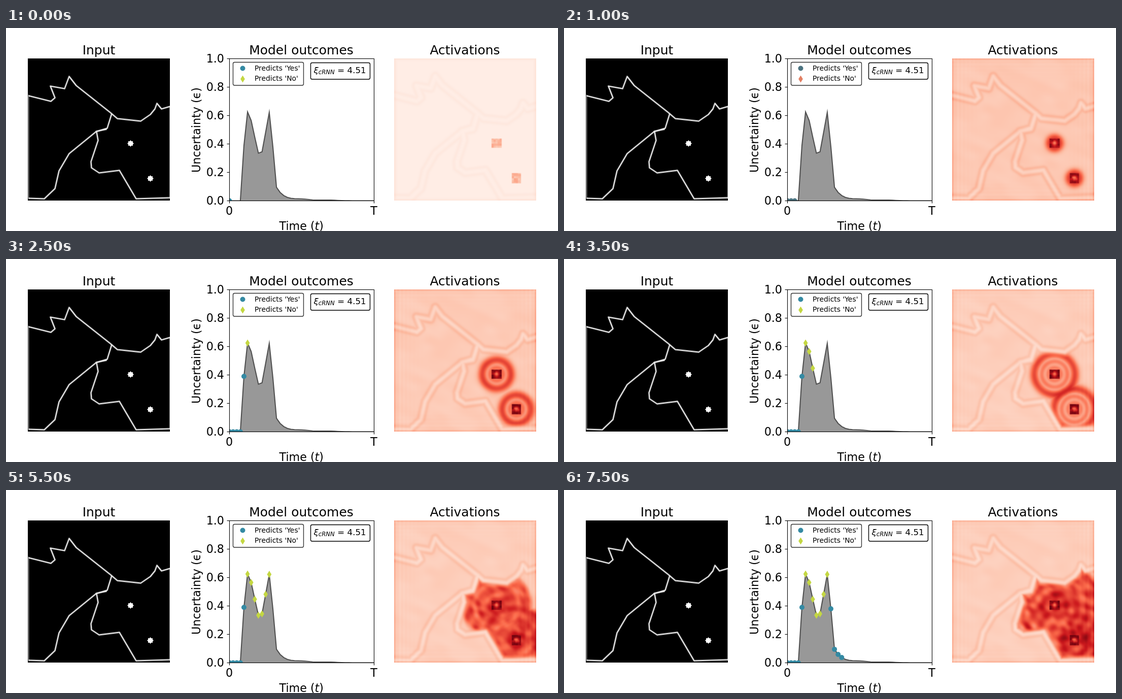
These frames come from a looping animation (1088x400 px, 8 s). An HTML page with a canvas:

```html
<!DOCTYPE html>
<html lang="en">
<head>
<meta charset="utf-8">
<title>Model outcomes</title>
<style>
html, body { margin: 0; width: 100%; height: 100%; overflow: hidden; background: #fff; }
canvas { display: block; }
</style>
</head>
<body>
<canvas id="stage" width="1088" height="400"></canvas>
<script>
const STEP_MS = 500, STEPS = 16;
const ctx = document.getElementById('stage').getContext('2d');
const FONT = '"DejaVu Sans", sans-serif';

const clamp = (v, a = 0, b = 1) => Math.min(b, Math.max(a, v));
const smooth = (a, b, v) => { const t = clamp((v - a) / (b - a)); return t * t * (3 - 2 * t); };
const mix = (a, b, t) => a + (b - a) * t;
const bump = (d, w) => Math.exp(-d * d / (w * w));

// Corner points of the outlines in the input panel.
const ridge = [[44, 133], [88, 144], [96, 137], [87, 114], [115, 119], [124, 95], [138, 113], [205, 166]];
const back = [[205, 166], [219, 178], [265, 183], [284, 170], [293, 159], [297, 148], [306, 159], [323, 154]];
const neck = [[208, 168], [199, 197], [176, 204]];
const slope = [[198, 199], [178, 203], [124, 247], [104, 281], [96, 316], [75, 336], [44, 335]];
const belly = [[178, 204], [181, 221], [167, 263], [168, 275], [183, 285], [223, 280], [256, 336], [323, 334]];
const outlines = [ridge, back, neck, slope, belly];
const dots = [[245, 227], [284, 296]];

// Two peaks, then a decaying tail with two faint bumps.
const peaks = [.39, .625, .565, .447, .335, .345, .482, .622, .38];
const value = i => i < 4 ? 0 : peaks[i - 4] ??
  .095 * .62 ** (i - 13) + .01 * bump(i - 20, 3) + .005 * bump(i - 27, 4);
const plotX = i => 440.5 + i * 285 / 40;
const plotY = v => 340.5 - v * 280;
const curve = Array.from({ length: 41 }, (_, i) => [plotX(i), plotY(value(i))]);
const saysNo = i => i >= 5 && i <= 11;

function trace(points, target = ctx) {
  points.forEach(([x, y], i) => i ? target.lineTo(x, y) : target.moveTo(x, y));
}
function stroke(points, color, width) {
  ctx.beginPath();
  trace(points);
  ctx.strokeStyle = color;
  ctx.lineWidth = width;
  ctx.stroke();
}
function text(str, x, y, size, align = 'center', style = '') {
  ctx.font = `${style} ${size}px ${FONT}`;
  ctx.textAlign = align;
  ctx.fillStyle = '#000';
  ctx.fillText(str, x, y);
  return x + ctx.measureText(str).width;
}
function box(x, y, w, h, color) {
  ctx.beginPath();
  ctx.roundRect(x, y, w, h, 3);
  ctx.fillStyle = '#fff';
  ctx.fill();
  ctx.strokeStyle = color;
  ctx.lineWidth = 1.4;
  ctx.stroke();
}
function marker(x, y, no, color) {
  ctx.beginPath();
  if (no) trace([[x, y - 7], [x + 4.4, y], [x, y + 7], [x - 4.4, y]]);
  else ctx.arc(x, y, 5, 0, 7);
  ctx.fillStyle = color;
  ctx.fill();
}

// Activation map: a scalar field on a coarse grid, coloured from white to dark red.
const N = 140, CELL = 2, LEFT = 43, TOP = 60, SIZE = N * CELL;
const ramp = ['fff5f0', 'fcbba1', 'fb6a4a', 'cb181d', '67000d'].map(h => parseInt(h, 16));
const channel = (rgb, ch) => rgb >> (16 - 8 * ch) & 255;
const map = document.createElement('canvas');
map.width = map.height = N;
const mapCtx = map.getContext('2d');

function segDist(x, y, [ax, ay], [bx, by]) {
  const dx = bx - ax, dy = by - ay;
  const t = clamp(((x - ax) * dx + (y - ay) * dy) / (dx * dx + dy * dy));
  return Math.hypot(x - ax - t * dx, y - ay - t * dy);
}
function hash(i, j) {
  const h = Math.sin(i * 127.1 + j * 311.7) * 43758.5453;
  return h - Math.floor(h);
}
function noise(x, y) {
  const i = Math.floor(x), j = Math.floor(y), u = smooth(0, 1, x - i), v = smooth(0, 1, y - j);
  return mix(mix(hash(i, j), hash(i + 1, j), u), mix(hash(i, j + 1), hash(i + 1, j + 1), u), v) * 2 - 1;
}

// The closed shape that holds both dots and the spreading waves.
const region = new Path2D();
trace([...back, ...belly.slice().reverse(), ...neck.slice(0, 2).reverse()], region);
region.closePath();

const cells = Array.from({ length: N * N }, (_, k) => {
  const x = LEFT + (k % N + .5) * CELL, y = TOP + (Math.floor(k / N) + .5) * CELL;
  const line = Math.min(...outlines.flatMap(o => o.slice(1).map((p, i) => segDist(x, y, o[i], p))));
  return {
    x, y, line,
    side: Math.min(x - LEFT, LEFT + SIZE - x),
    cap: Math.min(y - TOP, TOP + SIZE - y),
    inside: ctx.isPointInPath(region, x, y) ? smooth(0, 13, line) : 0,
    d: dots.map(([a, b]) => Math.hypot(x - a, y - b)),
    square: dots.map(([a, b]) => Math.max(Math.abs(x - a), Math.abs(y - b)))
  };
});

function backdrop(c, s, ready) {
  const early = bump(s - 3, 2), side = Math.exp(-c.side / 16), cap = Math.exp(-c.cap / 14);
  return .03 + .138 * ready + .04 * early
    - .05 * ready * bump(c.line, 3.2)
    + (.02 + .04 * ready + .02 * early) * bump(c.line - 6.5, 3)
    + (.04 + .08 * ready) * bump(Math.min(c.side, c.cap + 1), 4)
    + ready * (.03 * Math.cos(c.side * .8) * side + .02 * Math.cos(c.cap * .8) * cap)
    + .018 * ready * noise(c.x / 34 + c.y / 45, c.y / 18 - c.x / 40);
}

function ring(d, R, s) {
  const wake = .19 + .06 * Math.cos(d * .5) + .3 * Math.exp(-s / 3);
  return Math.max(.44 * bump(d - R + 7, 9), wake * smooth(R + 2, R - 8, d));
}

function waves(c, s) {
  const R = 5 + 6 * s, [a, b] = c.d, near = Math.min(a, b);
  const w1 = ring(a, R, s), w2 = ring(b, R, s);
  const rings = Math.max(w1, w2) + .25 * Math.min(w1, w2);
  const churn = .41 + .2 * bump(near, 30) + .05 * Math.cos(.3 * a - .9 * s) + .05 * Math.cos(.27 * b + .8 * s)
    + .14 * noise((c.x + c.y) / 22 + s * .3, (c.y - c.x) / 13 - s * .2);
  return mix(rings, churn * smooth(R + 4, R - 10, near), clamp((s - 7) / 5)) * c.inside;
}

function level(c, s) {
  const ready = 1 - Math.exp(-1.5 * s);
  let v = backdrop(c, s, ready);
  if (s > 1 && c.inside) v += waves(c, s);
  dots.forEach((_, i) => {
    const grain = hash(Math.floor(c.x / 4), Math.floor(c.y / 4)) - .5;
    const dark = .93 - .68 * Math.exp(-1.2 * s) + .14 * grain - .4 * ready * bump(c.d[i] - 1, 4);
    if (c.square[i] < 10) v = dark;
  });
  return clamp(v);
}

const activations = Array.from({ length: STEPS }, (_, s) => {
  const img = mapCtx.createImageData(N, N), top = ramp.length - 1;
  cells.forEach((c, k) => {
    const v = level(c, s) * top, i = Math.min(top - 1, Math.floor(v));
    for (let ch = 0; ch < 3; ch++) img.data[k * 4 + ch] = mix(channel(ramp[i], ch), channel(ramp[i + 1], ch), v - i);
    img.data[k * 4 + 3] = 255;
  });
  return img;
});

function drawInput() {
  ctx.fillStyle = '#000';
  ctx.fillRect(LEFT, TOP, SIZE, SIZE);
  ctx.save();
  ctx.beginPath();
  ctx.rect(LEFT, TOP, SIZE, SIZE);
  ctx.clip();
  ctx.translate(.5, .5);
  ctx.lineJoin = 'round';
  stroke([[44, 131], [44, 336]], '#8a8a8a', 1.8);
  stroke([[322, 154], [322, 335]], '#777', 1.4);
  for (const o of outlines) {
    stroke(o, 'rgba(255,255,255,.3)', 3.8);
    stroke(o, '#e8e8e8', 2.1);
  }
  ctx.fillStyle = '#fff';
  for (const [x, y] of dots) {
    ctx.beginPath();
    for (let i = 0; i < 16; i++) {
      const r = i % 2 ? 4.7 : 6.5, a = i * Math.PI / 8;
      ctx.lineTo(x + r * Math.cos(a), y + r * Math.sin(a));
    }
    ctx.fill();
  }
  ctx.restore();
}

function drawChart(s) {
  const muted = s > 0 && s < 5;
  const yes = muted ? '#4b7380' : '#348aa3', no = muted ? '#e28064' : '#c4d742';
  ctx.save();
  ctx.beginPath();
  ctx.rect(440, 60, 286, 281);
  ctx.clip();
  ctx.beginPath();
  trace(curve);
  ctx.fillStyle = '#989898';
  ctx.fill();
  stroke(curve, '#505050', 2.1);
  for (let i = 0; i <= s; i++) marker(...curve[i], saysNo(i), saysNo(i) ? no : yes);
  ctx.restore();

  ctx.strokeStyle = '#000';
  ctx.lineWidth = 1.1;
  ctx.strokeRect(440.5, 60.5, 285, 280);
  for (let i = 0; i <= 5; i++) {
    const y = 340.5 - 56 * i;
    stroke([[435.5, y], [440.5, y]], '#000', 1.1);
    text((i / 5).toFixed(1), 430, y + 7.5, 22.22, 'right');
  }
  ['0', 'T'].forEach((label, i) => {
    const x = plotX(40 * i);
    stroke([[x, 340.5], [x, 345.5]], '#000', 1.1);
    text(label, x - .5, 368, 22.22);
  });
  let x = text('Time (', 538.5, 398, 22.22, 'left');
  x = text('t', x, 398, 22.22, 'left', 'italic');
  text(')', x, 398, 22.22, 'left');
  ctx.save();
  ctx.translate(383, 201);
  ctx.rotate(-Math.PI / 2);
  text('Uncertainty (ϵ)', 0, 0, 22.22);
  ctx.restore();

  box(447.5, 67.5, 139, 45.5, '#333');
  marker(466.5, 79.5, false, yes);
  marker(466.5, 100.5, true, no);
  text("Predicts 'Yes'", 490, 84, 13.89, 'left');
  text("Predicts 'No'", 490, 104, 13.89, 'left');
  box(600.5, 68.5, 117, 32.5, '#000');
  text('ξ', 606.5, 89, 16.67, 'left', 'italic');
  text('cRNN', 615.8, 91, 11.67, 'left', 'italic');
  text(' = 4.51', 648, 89, 16.67, 'left');
}

function draw(s) {
  ctx.fillStyle = '#fff';
  ctx.fillRect(0, 0, 1088, 400);
  text('Input', 183, 52, 25);
  text('Model outcomes', 582, 52, 25);
  text('Activations', 904.5, 52, 25);
  drawInput();
  drawChart(s);
  mapCtx.putImageData(activations[s], 0, 0);
  ctx.drawImage(map, 765, TOP, SIZE, SIZE);
}

let shown = -1;
const start = performance.now();
function tick() {
  const s = Math.floor((performance.now() - start) / STEP_MS) % STEPS;
  if (s !== shown) draw(shown = s);
  requestAnimationFrame(tick);
}
tick();
</script>
</body>
</html>
```
